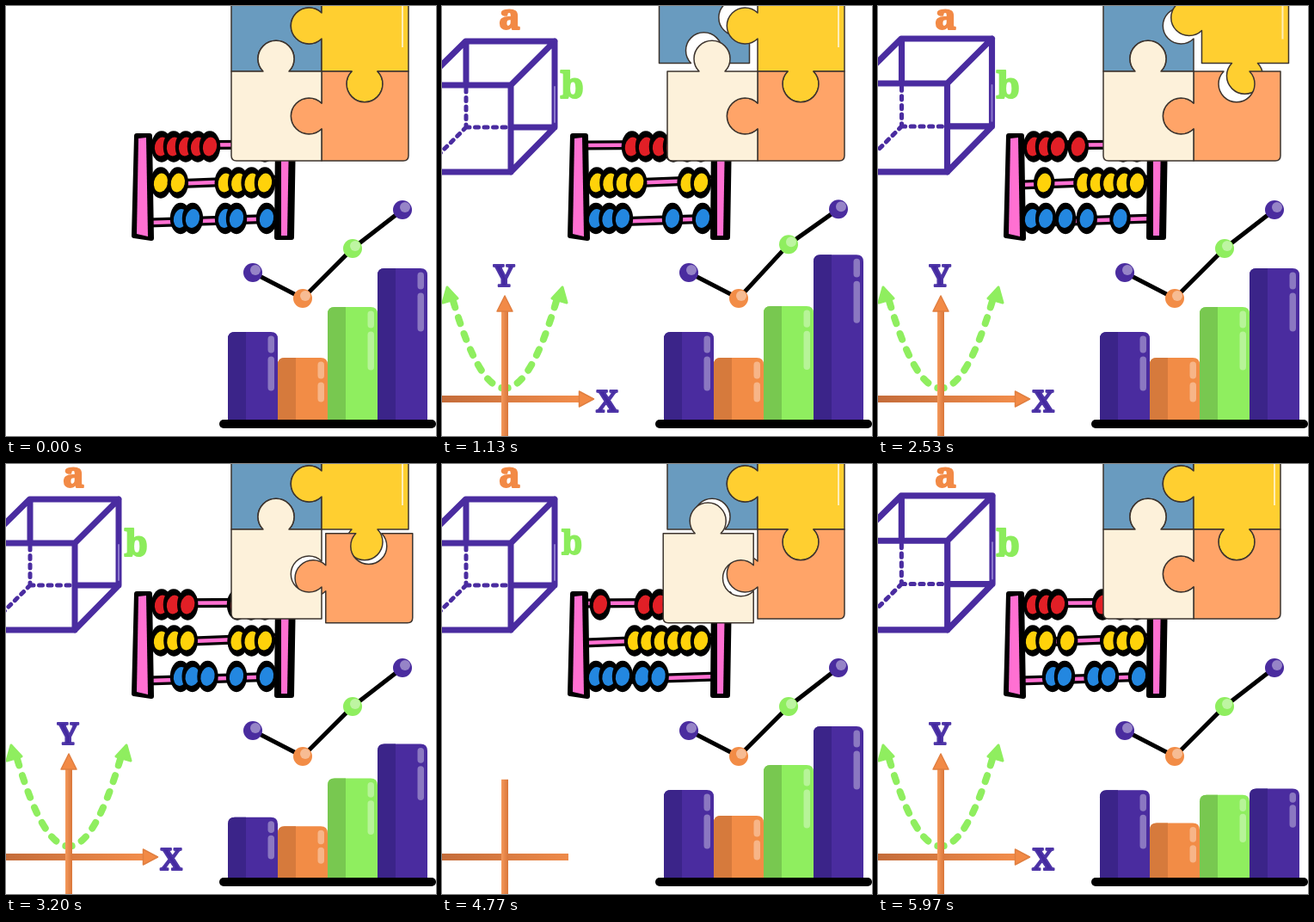
These frames come from a looping animation (500x500 px, 6010 ms). An HTML page:

```html
<!DOCTYPE html>
<html lang="en">
<head>
<meta charset="utf-8">
<title>Maths</title>
<style>
  html, body { margin: 0; width: 100%; height: 100%; overflow: hidden; background: #fff; }
  svg { display: block; width: 100%; height: 100%; }
  text { font: 900 35px "Noto Serif", serif; text-anchor: middle; stroke-width: 2; stroke-linejoin: round; }
</style>
</head>
<body>
<svg viewBox="0 0 500 500">
  <defs>
    <linearGradient id="across" gradientUnits="userSpaceOnUse" x1="0" y1="0" x2="170" y2="0">
      <stop offset="0" stop-color="#c46c3a"/><stop offset="1" stop-color="#f58f4c"/>
    </linearGradient>
    <linearGradient id="upright" gradientUnits="userSpaceOnUse" x1="69" y1="0" x2="77" y2="0">
      <stop offset="0" stop-color="#f59a5c"/><stop offset="1" stop-color="#d9763a"/>
    </linearGradient>
    <clipPath id="reveal"><rect id="revealBox" x="-10" width="180" height="140"/></clipPath>
  </defs>

  <g id="cube" fill="none" stroke="#4a2ca0" stroke-width="7" stroke-linejoin="round" stroke-linecap="round">
    <path d="M-24 92H80V193H-24ZM-24 92L27.5 41H131V141L80 193M80 92L131 41M28 41V88M82 141H131"/>
    <path d="M28 96V141M28 141H76M28 141L-24 193" stroke-width="5" stroke-dasharray="4 6.5"/>
    <path d="M131 94V135" stroke="#8c78cc" stroke-width="2"/>
  </g>
  <g id="labelA"><text y="11" style="font-size:42px" fill="#f28a46" stroke="#f28a46">a</text></g>
  <g id="labelB"><text y="16" style="font-size:42px" fill="#8cec5c" stroke="#8cec5c">b</text></g>

  <g id="graph">
    <g clip-path="url(#reveal)" fill="#8fee5f" stroke="#8fee5f" stroke-linejoin="round">
      <path d="M13 343Q73 546 133 343" fill="none" stroke-width="8" stroke-linecap="round"
            pathLength="24.75" stroke-dasharray="0.75 1.25"/>
      <path d="M6 327L18 340L1 345ZM140 327L128 340L145 345Z" stroke-width="3"/>
    </g>
    <rect id="xAxis" y="453" height="8" fill="url(#across)"/>
    <rect id="yAxis" x="69" width="8" fill="url(#upright)"/>
    <g fill="#f28a46" stroke="#e07f40" stroke-width="1.5" stroke-linejoin="round">
      <path id="xArrow" d="M0 -9L17 0L0 9Z"/>
      <path id="yArrow" d="M-9 0L0 -18L9 0Z"/>
    </g>
    <g id="labelX"><text y="13" fill="#4429a0" stroke="#4f36a8">X</text></g>
    <g id="labelY"><text y="13" fill="#4429a0" stroke="#4f36a8">Y</text></g>
  </g>

  <g id="rods"></g>
  <g stroke="#000" stroke-width="6" stroke-linejoin="round">
    <path d="M152 151L167 151L169 270L149 267Z"/>
    <path d="M316 151L334 151L332 269L315 269Z"/>
    <path d="M154 154L163 153L165 268L152 265Z" fill="#ff70d2" stroke="none"/>
    <path d="M320 154L329 154L327 267L320 267Z" fill="#ff70d2" stroke="none"/>
  </g>
  <g id="beads"></g>

  <g id="puzzle" stroke="#3d342e" stroke-width="1.5" stroke-linejoin="round"></g>

  <g id="bars"></g>
  <path d="M253 486H495" stroke="#000" stroke-width="10" stroke-linecap="round"/>
  <polyline id="trend" fill="none" stroke="#000" stroke-width="5"/>
  <g id="dots"></g>
</svg>
<script>
const LOOP = 6010, BEAT = 2860, CUBE = 3850, GRAPH = 4400;
const $ = id => document.getElementById(id);
const set = (el, attrs) => { for (const k in attrs) el.setAttribute(k, attrs[k]); return el; };
const add = (parent, tag, attrs = {}) =>
  set(parent.appendChild(document.createElementNS("http://www.w3.org/2000/svg", tag)), attrs);

const ramp = (t, from, to) => Math.min(1, Math.max(0, (t - from) / (to - from)));
const smooth = (t, from, to) => { const x = ramp(t, from, to); return x * x * (3 - 2 * x); };
// 1 at the centre, easing to 0 at either side
const bell = (t, centre, width) => 1 - smooth(Math.abs(t - centre), 0, width);
// Rises to 1, stays, falls back to 0
const visit = (t, enter, leave, time) => smooth(t, enter, enter + time) - smooth(t, leave, leave + time);

const place = (id, x, y, sx, sy = sx) => set($(id), {
  transform: `translate(${x} ${y}) scale(${sx} ${sy})`,
  visibility: sx * sy > 0.0001 ? "visible" : "hidden"
});

// Puzzle
const knob = "A21 21 0 1 1 ", socket = "A21 21 0 1 0 ";
const pieces = [
  { fill: "#699bbf", dx: -1, dy: -1, start: 480,
    d: `M262 -28V76H299${knob}329 76H367V38${knob}367 8V-28Z` },
  { fill: "#ffcf30", dx: 1, dy: -1, start: 1700,
    d: `M367 -28V8${socket}367 38V76H402${socket}432 76H468V-28Z` },
  { fill: "#ffa468", dx: 1, dy: 1, start: 3030,
    d: `M367 76H402${socket}432 76H468V174Q468 180 462 180H367V143${knob}367 113Z` },
  { fill: "#fdf1da", dx: -1, dy: 1, start: 4600,
    d: `M262 76H299${knob}329 76H367V113${socket}367 143V180H268Q262 180 262 174Z` }
];
for (const p of pieces) {
  p.el = add($("puzzle"), "g");
  add(p.el, "path", { d: p.d, fill: p.fill });
}
add(pieces[1].el, "path", { d: "M461 -10V48", stroke: "#ffeeb8", "stroke-width": 2 });

function drawPuzzle(t) {
  for (const { el, dx, dy, start } of pieces) {
    const shift = 9.5 * visit(t, start, start + 820, 340);
    set(el, { transform: `translate(${dx * shift} ${dy * shift})` });
  }
}

// Abacus: every bead rests at home, slides away and comes back
const SLIDE = 300;
const rows = [
  { y: 163.5, fill: "#e11f26", rod: [162, 161], count: 6, movers: 5, offset: 0,
    home: i => 181 + 14 * i, away: i => 301 - 16 * (5 - i),
    leave: i => Math.max(0, 30 + 270 * (3 - i)), back: i => 1660 + 220 * i },
  { y: 205.5, fill: "#ffd20a", rod: [208, 202], count: 6, movers: 4, offset: 2340,
    home: i => 301 - 15.4 * (5 - i), away: i => 180 + 15.4 * i,
    leave: i => 280 * i, back: i => 1770 + 110 * (3 - i) },
  { y: 247, fill: "#2387e0", rod: [252, 247], count: 5, movers: 5, offset: 0,
    home: i => [203, 217, 255, 268, 303][i], away: i => 179 + 15.5 * i,
    leave: i => i < 3 ? 440 - 120 * i : 1690, back: i => 2550 - 50 * i }
];
for (const row of rows) {
  for (const [stroke, width] of [["#000", 11], ["#ff70d2", 4.5]]) {
    add($("rods"), "path", { d: `M166 ${row.rod[0]}L320 ${row.rod[1]}`, stroke, "stroke-width": width });
  }
  row.nodes = Array.from({ length: row.count }, () => {
    const g = add($("beads"), "g");
    add(g, "ellipse", { rx: 12.2, ry: 18.2 });
    add(g, "ellipse", { rx: 8, ry: 11, fill: row.fill, transform: "rotate(12)" });
    return g;
  });
}
function drawAbacus(u) {
  for (const row of rows) {
    const v = (u - row.offset + BEAT) % BEAT;
    row.nodes.forEach((g, i) => {
      const home = row.home(i), away = row.away(i);
      const x = i < row.movers
        ? home + (away - home) * visit(v, row.leave(i), row.back(i), SLIDE)
        : 301 - 15.4 * (row.count - 1 - i);
      set(g, { transform: `translate(${x} ${row.y})` });
    });
  }
}

// Bar chart
const purple = ["#4a2c9f", "#3b2489"], orange = ["#f28c46", "#d67a3c"], green = ["#8fee5f", "#78c850"];
const bars = [
  { color: purple, height: 103, shine: 68, dotY: 310, dip: 0.37 },
  { color: orange, height: 73, shine: 51, dotY: 340, dip: 0.19 },
  { color: green, height: 132, shine: 73, dotY: 282, dip: 0.27 },
  { color: purple, height: 177, shine: 73, dotY: 237, dip: 0.41 }
];
bars.forEach((b, i) => {
  const g = add($("bars"), "g", { transform: `translate(${258 + i * 58} 0)` });
  const pill = () => add(g, "rect", { x: 46.5, width: 7.5, rx: 3.75, fill: "#fff", opacity: 0.36 });
  b.body = add(g, "path", { fill: b.color[0] });
  b.side = add(g, "path", { fill: b.color[1] });
  b.short = pill();
  b.long = pill();
  b.dot = add($("dots"), "g");
  add(b.dot, "circle", { r: 11, fill: b.color[0] });
  add(b.dot, "circle", { cx: 3, cy: -3, r: 6, fill: "#fff", opacity: 0.42 });
});
function drawChart(u) {
  const points = bars.map((b, i) => {
    const peak = 870 + 85 * i;
    const s = 1 - b.dip * bell(u, 250 + 15 * (3 - i) ** 2, 140)
      - 0.5 * bell(u, peak - 330, 230) + 0.09 * bell(u, peak, 110);
    const top = 482 - b.height * s;
    set(b.body, { d: `M0 482V${top + 8}q0 -8 8 -8H50q8 0 8 8V482Z` });
    set(b.side, { d: `M0 482V${top + 8}q0 -8 8 -8H21V482Z` });
    set(b.short, { y: top + 4.5, height: 20 * s });
    set(b.long, { y: top + 4.5 + 24 * s, height: (b.shine - 28) * s });
    const x = 287 + 58 * i, y = b.dotY - 5 * bell(u, peak + 80, 100);
    set(b.dot, { transform: `translate(${x} ${y})` });
    return `${x},${y}`;
  });
  set($("trend"), { points: points.join(" ") });
}

function drawCube(u) {
  const s = visit(u, 50, 3420, 430) + 0.04 * bell(u, 2300, 450);
  set($("cube"), {
    transform: `translate(53.5 197) scale(${s}) translate(-53.5 -197)`,
    visibility: s > 0.005 ? "visible" : "hidden"
  });
  place("labelA", 78.5, 15.5, visit(u, 500, 3730, 110));
  place("labelB", 151, 91, visit(u, 700, 3560, 280));
}

function drawGraph(u) {
  const axis = ramp(u, 100, 395) - ramp(u, 3745, 4050);
  const arrow = ramp(u, 395, 500) - ramp(u, 3580, 3738);
  const curve = ramp(u, 500, 850) - ramp(u, 3360, 3580);
  const label = visit(u, 800, 3230, 170);
  set($("xAxis"), { width: 160 * axis });
  set($("yAxis"), { y: 500 - 145 * axis, height: 145 * axis });
  place("xArrow", 159.5, 457, arrow, arrow > 0 ? 1 : 0);
  place("yArrow", 73, 355, arrow);
  set($("revealBox"), { y: 450 - 130 * curve, height: 130 * curve });
  place("labelX", 192, 459, label);
  place("labelY", 72, 313, label);
}

function draw(now) {
  const t = now % LOOP;
  drawPuzzle(t);
  drawAbacus(t % BEAT);
  drawChart(t % BEAT);
  drawCube(t % CUBE);
  drawGraph(t % GRAPH);
}
const begin = performance.now();
function tick() {
  draw(performance.now() - begin);
  requestAnimationFrame(tick);
}
draw(0);
requestAnimationFrame(tick);
</script>
</body>
</html>
```
